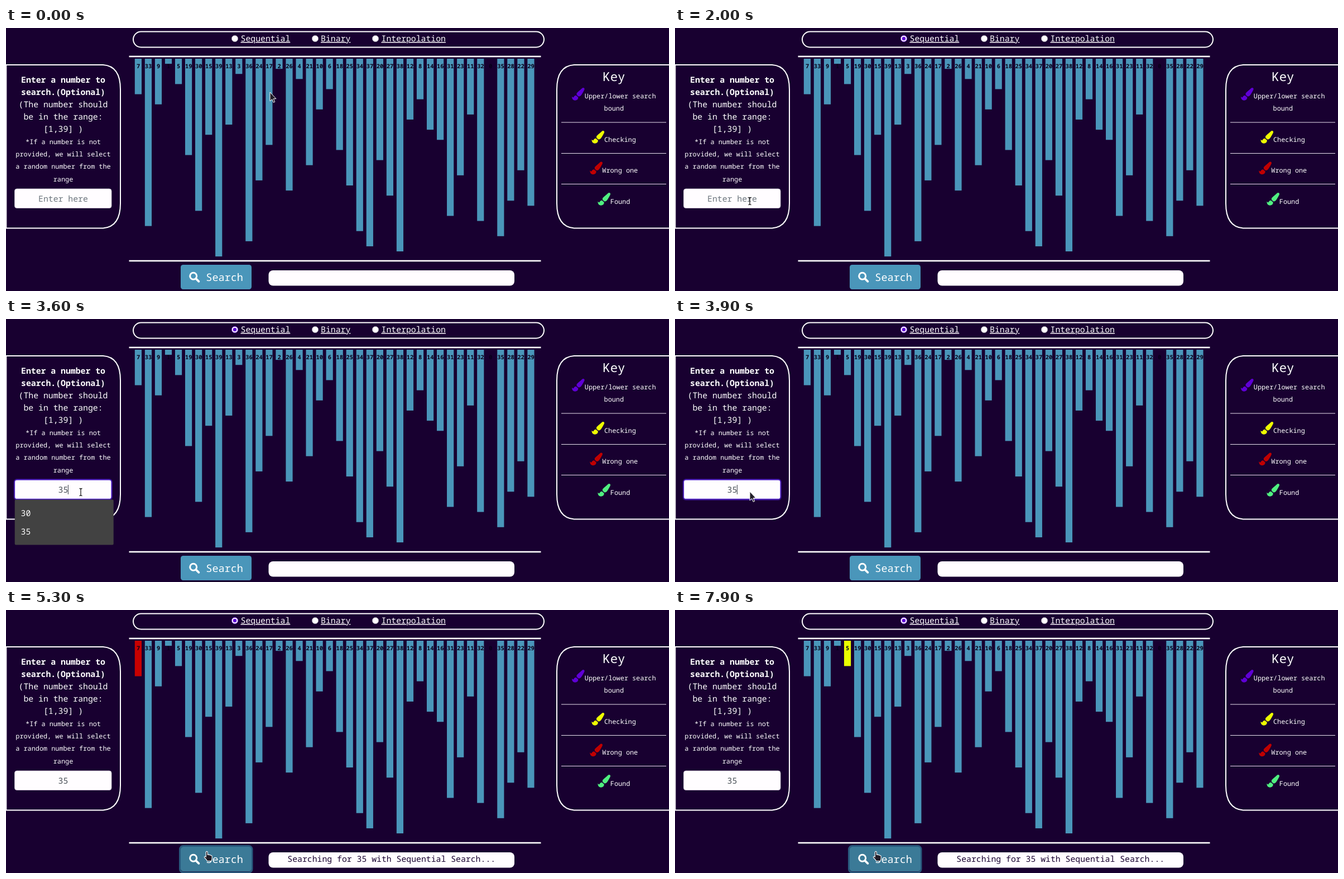
Write an HTML page that moves like this. It is 1188x471 px and loops after 8 s.

```html
<!DOCTYPE html>
<html lang="en">
<head>
<meta charset="utf-8">
<title>Search visualizer</title>
<style>
  html, body { margin: 0; width: 100%; height: 100%; overflow: hidden; background: #180030; }
  svg { display: block; width: 100vw; height: 100vh; }
  text {
    font-family: "Noto Sans Mono", "DejaVu Sans Mono", monospace;
    font-size: 14.8px; fill: #fff; text-rendering: geometricPrecision; white-space: pre;
  }
  .mid { text-anchor: middle; }
  .bold { font-weight: 700; }
  .small { font-size: 11.84px; }
  .num { font-size: 10.4px; font-weight: 700; fill: #08001a; text-anchor: middle; }
  .link { text-decoration: underline; }
  .line { fill: none; stroke: #fff; stroke-width: 2; }
</style>
</head>
<body>
<svg id="stage" viewBox="0 0 1188 471" xmlns="http://www.w3.org/2000/svg"></svg>
<script>
const LOOP = 8000, TICK = 100;
const BLUE = '#4a96ba', YELLOW = '#e9ff00', RED = '#c80000', PURPLE = '#5f00d6', PAPER = '#fffdff';
const values = [7, 33, 9, 1, 5, 19, 30, 15, 39, 13, 3, 36, 24, 17, 2, 26, 4, 21, 10, 6,
  18, 25, 34, 37, 20, 27, 38, 12, 8, 14, 16, 31, 23, 11, 32, 0, 35, 28, 22, 29];

const stage = document.getElementById('stage');
const text = (x, y, s, cls = '', extra = '') => `<text x="${x}" y="${y}" class="${cls}" ${extra}>${s}</text>`;
const rect = (x, y, w, h, fill, r = 0, extra = '') =>
  `<rect x="${x}" y="${y}" width="${w}" height="${h}" rx="${r}" fill="${fill}" ${extra}/>`;

function brush(x, y, color) {
  return `<g transform="translate(${x} ${y}) scale(.0442)" fill="${color}">
    <path d="M167 309C127 312 90 327 70 382C63 400 44 391 0 357C0 440 38 512 128 512C204 512 256 468 256 392L255 383Z"/>
    <path d="M458 0C443 0 429 7 418 16C213 199 192 203 192 257Q192 277 201 296L265 349Q276 352 287 352
      C349 352 385 307 498 96C505 81 512 66 512 50C512 21 486 0 458 0Z"/></g>`;
}

function radio(x, id) {
  return `<circle id="${id}" cx="${x}" cy="19" r="5.7" fill="${PAPER}" stroke="#8d8598" stroke-width=".8"/>`;
}

function bar(v, i) {
  const x = 230.8 + 18.04 * i;
  return rect(x, 55, 12.2, v * 9.08, BLUE, 0, `id="bar${i}"`) + text(x + 6.2, 72, v, 'num');
}

function topBar() {
  return rect(228, 6.5, 736, 28, 'none', 14, 'class="line"')
    + radio(410, 'seq') + radio(554, 'bin') + radio(662, 'inter')
    + `<circle id="dot" cx="410" cy="19" r="3.2" fill="${PURPLE}"/>`
    + text(420.5, 24, 'Sequential', 'link') + text(564, 24, 'Binary', 'link')
    + text(672.5, 24, 'Interpolation', 'link');
}

function leftPanel() {
  const big = ['Enter a number to', 'search.(Optional)', '(The number should', 'be in the range:', '[1,39] )'];
  const note = ['*If a number is not', 'provided, we will select', 'a random number from the', 'range'];
  return '<path class="line" d="M.3 66H174Q205 68 205 110V314Q205 356 174 358.5H.3Z"/>'
    + big.map((s, i) => text(102.5, 97.5 + 22.2 * i, s, i < 2 ? 'mid bold' : 'mid')).join('')
    + note.map((s, i) => text(102.5, 208 + 22.2 * i, s, 'mid small')).join('')
    + rect(13.5, 286, 177.5, 39, '#34108a', 6, 'id="glow" opacity=".8"')
    + rect(15.5, 288, 173.5, 34.5, PAPER, 4, 'id="field" stroke="#cfcad6" stroke-width=".8"')
    + text(102.5, 311, '', 'mid', 'id="entry"')
    + rect(102, 297, 1, 17, '#333a42', 0, 'id="caret"')
    + '<g id="menu">' + rect(15.7, 323.5, 177, 81, '#424242', 2)
    + text(26.5, 353, '30', '', 'font-weight="500"')
    + text(26.5, 386, '35', '', 'font-weight="500"') + '</g>';
}

function rightPanel() {
  const rule = y => rect(995, y, 188, 1, '#e9e4ef');
  return '<path class="line" d="M1190 66H1018Q987 68 987 110V314Q987 356 1018 358.5H1190"/>'
    + text(1089.3, 94.5, 'Key', 'mid', 'style="font-size:22.2px"')
    + brush(1014, 107, PURPLE) + text(1036.8, 126, 'Upper/lower search', 'small')
    + text(1089.3, 148.2, 'bound', 'mid small') + rule(168.5)
    + brush(1049.5, 184, '#eeff00') + text(1072, 203.7, 'Checking', 'small') + rule(224)
    + brush(1046.3, 239.5, '#c00000') + text(1068.3, 259, 'Wrong one', 'small') + rule(279)
    + brush(1060.4, 295, '#50f080') + text(1082.8, 314.5, 'Found', 'small');
}

function bottomBar() {
  return rect(311.5, 422.5, 129.5, 47.5, 'none', 6, 'id="ring" stroke="#28587c" stroke-width="3"')
    + rect(313, 424, 127, 44, BLUE, 4.5, 'id="button"')
    + `<circle cx="335.7" cy="444.2" r="6" fill="none" stroke="#fff" stroke-width="3"/>
       <path d="M340.3 448.8L345.4 453.8" stroke="#fff" stroke-width="3.8" stroke-linecap="round"/>`
    + text(358.3, 453, 'Search', '', 'style="font-size:18.5px"')
    + rect(470.5, 434, 440.5, 27.5, PAPER, 8)
    + text(690.7, 451.3, '', 'mid', 'id="status" style="fill:#180030"');
}

const cursors = `
  <path id="arrow" d="M0 0V16L3.7 12.6L6.2 18.4L8.7 17.3L6.3 11.7H11Z" fill="#211c28" stroke="#fff" stroke-width="1"/>
  <path id="beam" d="M-2.5 -6.5Q0 -6.5 0 -5Q0 -6.5 2.5 -6.5M0 -5V5M-2.5 6.5Q0 6.5 0 5Q0 6.5 2.5 6.5"
    fill="none" stroke="#1c1c1c" stroke-width="1.3"/>
  <path id="hand" d="M-1.7 9V1Q-1.7 -.6 -.2 -.6Q1.3 -.6 1.3 1V5.3Q3.2 4.3 4.2 5.8Q6 5 7 6.7Q9.2 6.2 9.2 8.5V12
    Q9 14.5 7.8 16.5H.5Q-.8 13.5 -3.9 11Q-5.2 9.6 -4 8.6Q-2.9 8 -1.7 9Z" fill="#211c28" stroke="#fff" stroke-width="1.1"/>`;

stage.innerHTML = topBar() + rect(220.5, 49.7, 738, 2.6, '#fff') + rect(220.5, 415.7, 738, 2.6, '#fff')
  + values.map(bar).join('') + leftPanel() + rightPanel() + bottomBar() + `<g id="pointer">${cursors}</g>`;

const el = {};
stage.querySelectorAll('[id]').forEach(n => el[n.id] = n);
const show = (node, on) => node.setAttribute('visibility', on ? 'visible' : 'hidden');

// Pointer route: time, x, y
const route = [[300, 473, 115], [400, 458, 87], [500, 458, 87], [600, 440, 57], [700, 426, 33], [900, 426, 33],
  [1200, 410, 20], [1400, 410, 20], [1600, 345, 105], [1800, 205, 250], [2000, 134, 310], [3800, 134, 310],
  [3900, 134, 309], [4000, 188, 383], [4100, 188, 383], [4300, 285, 418], [4500, 352, 434], [4600, 360, 433]];

function place(t) {
  const k = route.findIndex(p => p[0] >= t);
  if (k === 0) return route[0].slice(1);
  if (k < 0) return route[route.length - 1].slice(1);
  const a = route[k - 1], b = route[k], u = (t - a[0]) / (b[0] - a[0]);
  return [a[1] + (b[1] - a[1]) * u, a[2] + (b[2] - a[2]) * u];
}

function barColor(i, t) {
  const age = t - 5100 - 700 * i;
  if (t < 5300 || age < 0 || age >= 700) return BLUE;
  return age < 200 ? YELLOW : RED;
}

function draw(t) {
  const within = (a, b) => t >= a && t < b;

  const checked = t >= 1200;
  show(el.dot, checked);
  el.seq.setAttribute('stroke', checked ? PURPLE : '#8d8598');

  const focus = within(2100, 4700);
  show(el.glow, focus);
  el.field.setAttribute('stroke', focus ? '#5a2bd0' : '#cfcad6');
  el.field.setAttribute('stroke-width', focus ? 1.3 : .8);
  const typed = t < 3100 ? '' : t < 3600 ? '3' : '35';
  el.entry.textContent = typed || 'Enter here';
  el.entry.style.fill = typed ? '#495057' : '#6c757d';
  el.caret.setAttribute('x', 102 + typed.length * 4.44);
  show(el.caret, within(2200, 2700) || within(3100, 4700));
  show(el.menu, within(2200, 3700));

  el.button.setAttribute('fill', t >= 4400 ? '#3b7a97' : BLUE);
  show(el.ring, t >= 4700);
  el.status.textContent = t >= 5300 ? 'Searching for 35 with Sequential Search...' : '';
  for (let i = 0; i < 6; i++) el['bar' + i].setAttribute('fill', barColor(i, t));

  const [x, y] = place(t);
  el.pointer.setAttribute('transform', `translate(${x} ${y})`);
  const beam = within(2000, 3900), hand = t >= 4400;
  show(el.beam, beam);
  show(el.hand, hand);
  show(el.arrow, !beam && !hand);
}

const start = performance.now();
function loop() {
  const t = (performance.now() - start) % LOOP;
  draw(Math.floor(t / TICK) * TICK);
  requestAnimationFrame(loop);
}
loop();
</script>
</body>
</html>
```
